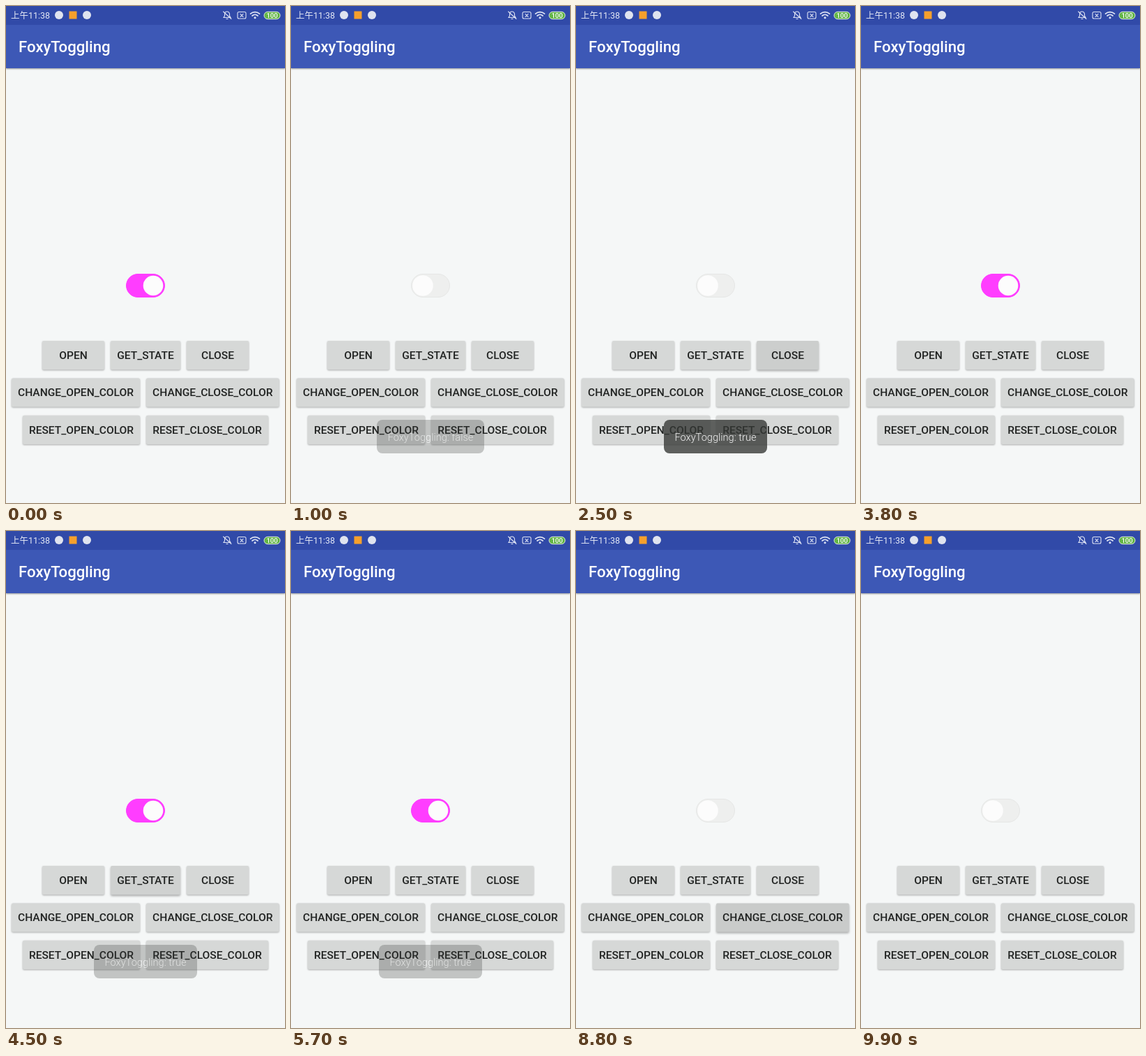
Write an HTML page that moves like this. It is 400 px wide and 711 px high and loops after 10000 ms.

```html
<!DOCTYPE html>
<html lang="zh">
<head>
<meta charset="utf-8">
<title>Switch demo</title>
<style>
  html, body { margin: 0; width: 100%; height: 100%; overflow: hidden; background: #f5f7f7; }
  svg { display: block; width: 100vw; height: 100vh; font-family: Roboto, "Noto Sans CJK SC", "Noto Sans CJK", sans-serif; }
  .label { font-size: 15.55px; font-weight: 500; fill: #212322; text-anchor: middle; }
  .toast { font-size: 14.6px; font-weight: 300; fill: #f4f4f4; text-anchor: middle; }
</style>
</head>
<body>
<svg viewBox="0 0 400 711" preserveAspectRatio="none">
  <rect width="400" height="711" fill="#f5f7f7"/>
  <rect width="400" height="89" fill="#3d58b6" style="filter:drop-shadow(0 1px 1px rgba(0,0,0,.4))"/>
  <rect width="400" height="27" fill="#314aa8"/>
  <text x="18" y="66" font-size="22.2" font-weight="500" fill="#fff">FoxyToggling</text>

  <g id="status">
    <text x="7" y="18.3" font-size="12.5" fill="#e6eaf6">上午11:38</text>
    <circle cx="76" cy="13" r="6" fill="#dfe3ef"/>
    <rect x="90.5" y="7.5" width="11" height="11" fill="#f6a02c"/>
    <circle cx="116" cy="13" r="6" fill="#dfe3ef"/>
    <g fill="none" stroke="#dfe4f4" stroke-width="1.1" stroke-linecap="round">
      <path d="M312 16.5h10l-1.5-2.5v-2.500a3.500 3.500 0 0 0-7 0v2.500zM316 18.500h2M311.500 8l11.500 10.500"/>
      <rect x="332" y="8.500" width="12" height="9.500" rx="2"/>
      <path d="M336 11.300l4 4m0-4l-4 4"/>
      <path stroke-width="1.700" d="M350.500 11.200a9.500 9.500 0 0 1 13 0M353 14a6 6 0 0 1 8 0"/>
      <circle cx="357" cy="16.800" r="1" fill="#dfe4f4"/>
    </g>
    <rect x="370" y="8.300" width="23" height="10.400" rx="5.200" fill="#62b545" stroke="#e6eedf"/>
    <text x="381.500" y="17" font-size="9.500" font-weight="500" fill="#fff" text-anchor="middle">100</text>
  </g>

  <g id="switch">
    <rect id="track" x="172.500" y="383.500" width="55" height="33" rx="16.500"/>
    <circle id="thumb" cy="400"/>
  </g>
  <g id="buttons"></g>
  <g id="toasts"></g>
</svg>
<script>
const LOOP = 10000, STEP = 100;
const PINK = [255, 61, 255], ACCENT = [255, 64, 129], BLUE = [0, 146, 255];
const PALE = [238, 239, 238], INDIGO = [63, 81, 181];

// label, x, top, width, presses as [start, duration]
const buttons = [
  ["OPEN", 52, 479, 89, [[3200, 500]]],
  ["GET_STATE", 150, 479, 100, [[600, 200], [2200, 200], [4300, 400]]],
  ["CLOSE", 259, 479, 89, [[2300, 500], [7800, 400]]],
  ["CHANGE_OPEN_COLOR", 8, 532.4, 184, [[6200, 400]]],
  ["CHANGE_CLOSE_COLOR", 201, 532.4, 190.500, [[8700, 400]]],
  ["RESET_OPEN_COLOR", 24, 585.800, 168, [[6900, 400]]],
  ["RESET_CLOSE_COLOR", 201, 585.800, 175, [[9300, 400]]]
];

// word, width, fade-in start, fade-out start
const toasts = [
  ["false", 154, 1000, 2200],
  ["true", 148, 2300, 3400],
  ["true", 148, 4500, 5600]
];

// start, end, direction of each slide
const slides = [[600, 800, -1], [1400, 1700, 1], [2300, 2500, -1], [3400, 3700, 1], [7800, 8100, -1]];

const $ = id => document.getElementById(id);
const clamp = v => Math.max(0, Math.min(1, v));
const ramp = (t, start, end) => clamp((t - start + STEP) / (end - start + STEP));
const ease = p => p * p * (3 - 2 * p);
const mix = (a, b, p) => a + (b - a) * p;
const rgb = c => `rgb(${c.map(Math.round)})`;

function add(parent, tag, attributes, text = "") {
  const node = document.createElementNS("http://www.w3.org/2000/svg", tag);
  for (const name in attributes) node.setAttribute(name, attributes[name]);
  node.textContent = text;
  return parent.appendChild(node);
}

const buttonViews = buttons.map(([label, x, y, width, presses]) => {
  const box = { x, y, width, height: 41.200, rx: 2 };
  const face = add($("buttons"), "rect", { ...box, fill: "#d6d8d7" });
  const ripple = add($("buttons"), "rect", { ...box, fill: "#000" });
  add($("buttons"), "text", { x: x + width / 2, y: y + 26, class: "label" }, label);
  return { face, ripple, presses };
});

const toastViews = toasts.map(([word, width, start, end]) => {
  const group = add($("toasts"), "g", {});
  add(group, "rect", { x: 200 - width / 2, y: 592, width, height: 48, rx: 8, fill: "#343734", "fill-opacity": 0.78 });
  add(group, "text", { x: 200, y: 622, class: "toast" }, "FoxyToggling: " + word);
  return { group, start, end };
});

function drawSwitch(t) {
  const on = slides.reduce((p, [start, end, way]) => p + way * ease(ramp(t, start, end)), 1);
  const open = t < 6400 ? PINK : t < 7100 ? ACCENT : BLUE;
  const closed = t >= 8900 && t < 9500 ? INDIGO : PALE;
  const color = closed.map((c, i) => mix(c, open[i], on));
  $("track").setAttribute("fill", rgb(color));
  $("track").setAttribute("stroke", rgb(color.map(c => c - 8 * (1 - on))));
  $("thumb").setAttribute("cx", mix(189, 211, on));
  $("thumb").setAttribute("r", mix(14.800, 14.300, on));
  $("thumb").setAttribute("fill", "#fcfcfc");
}

function draw(t) {
  drawSwitch(t);
  for (const { face, ripple, presses } of buttonViews) {
    const press = presses.find(([start, length]) => t >= start && t < start + length);
    const fade = press ? 1 - ramp(t, press[0], press[0] + press[1] - STEP) : 0;
    ripple.setAttribute("opacity", 0.12 * fade);
    face.style.filter = press
      ? "drop-shadow(0 2px 1.5px rgba(0,0,0,.3))"
      : "drop-shadow(0 1px 1px rgba(0,0,0,.3))";
  }
  for (const { group, start, end } of toastViews) {
    group.setAttribute("opacity", ramp(t, start, start + 200) * (1 - ramp(t, end, end + 200)));
  }
}

function frame() {
  draw(Math.floor(performance.now() % LOOP / STEP) * STEP);
  requestAnimationFrame(frame);
}
frame();
</script>
</body>
</html>
```
